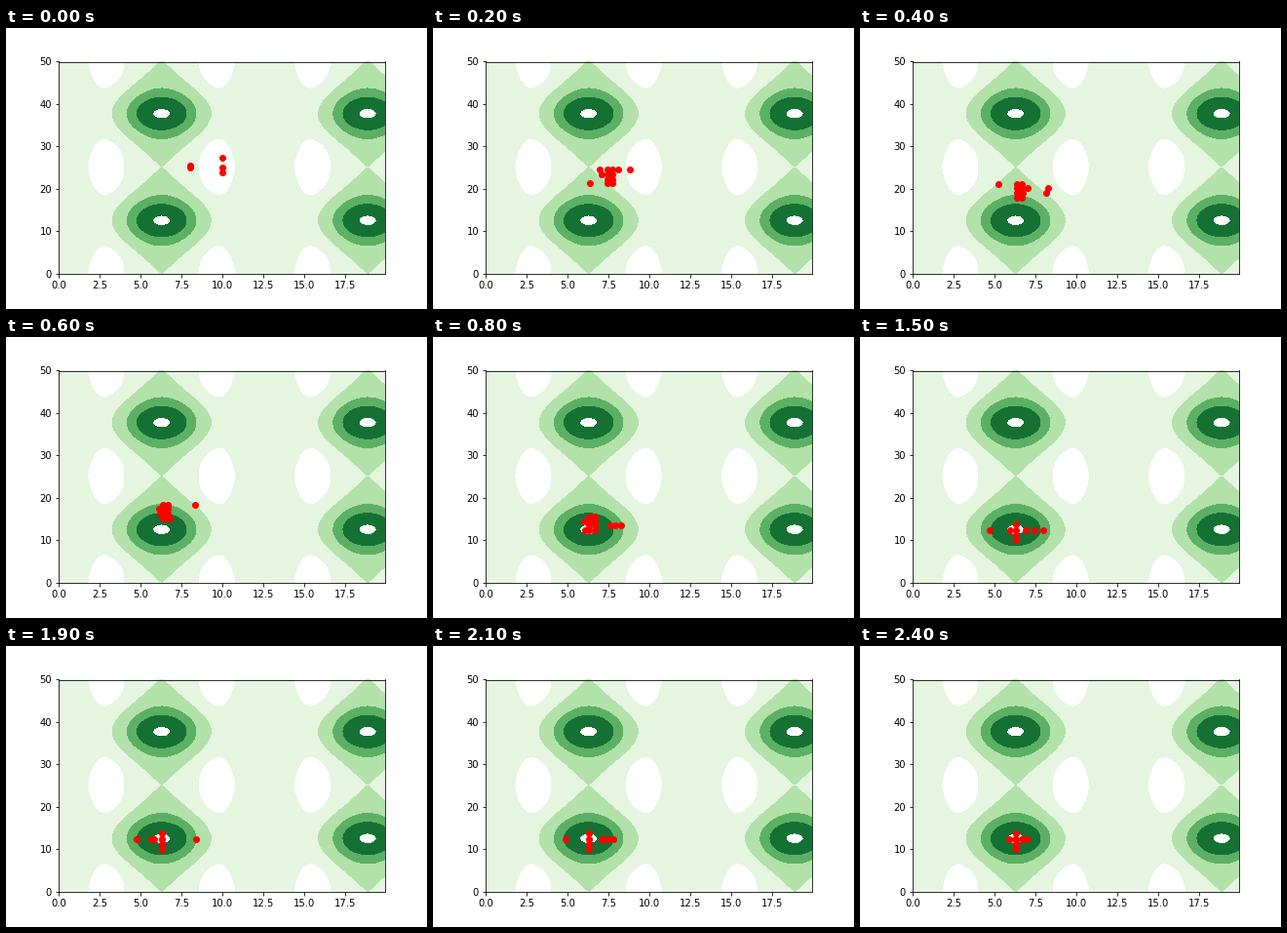
Recreate the animation shown at these times as a matplotlib script. Size 432 by 288 pixels, loop 2.5 s.

```python
import numpy as np
import matplotlib.pyplot as plt
from matplotlib.animation import FuncAnimation

FRAMES, STEP_MS = 25, 100
PEAK_X, PEAK_Y = 6.32, 12.5
CONVERGED = 10
LEVELS = [-1, 0, 1.29, 2.2, 3.03]
GREENS = ["#e5f5e0", "#b2e1aa", "#5cb064", "#157133"]


def fitness(x, y):
    """Periodic landscape with peaks at (2 pi, 4 pi) and saddles between."""
    p, s = -np.cos(x / 2), (1 - np.cos(y / 4)) / 2
    valley = ((p + 0.097) ** 2 - 1.2034) / 0.9204
    slope = 1.42 * p**2
    bend = 1.17 + 1.5 * p - 0.95 * p**4
    return valley + slope * s + bend * s**2


def start():
    """Two parents, each with a few mutated y genes."""
    return [(8.05, 25.1), (8.05, 25.5)] + [(10, y) for y in (23.9, 25, 27.4)]


def climbing(n, rng):
    """Block of shared genes drifting to the peak, with x mutants around it."""
    cx = np.interp(n, [1, 4, CONVERGED], [8, 6.35, PEAK_X])
    cy = np.interp(n, [1, 4, 8, CONVERGED], [24.5, 19.6, 14, PEAK_Y])
    ys = cy + np.linspace(-1.6, 1.6, 4)
    block = [(cx + dx, y) for dx in (0, 0.3) for y in ys]
    mutants = [(cx + dx, rng.choice(ys)) for dx in rng.uniform(-1.4, 2, 5)]
    return block + mutants


def settled(rng):
    """Cross of single-gene mutants around the peak."""
    column = [(PEAK_X, PEAK_Y + 1.2 * k) for k in range(-2, 2)]
    row = [(PEAK_X + dx, PEAK_Y) for dx in rng.uniform(-1.8, 2.4, 5)]
    return column + row


def population(n):
    if n == 0:
        return start()
    rng = np.random.default_rng(n)
    return climbing(n, rng) if n < CONVERGED else settled(rng)


fig, ax = plt.subplots(figsize=(6, 4), dpi=72)
fig.subplots_adjust(left=0.125, right=0.9, bottom=0.125, top=0.8815)
X, Y = np.meshgrid(np.arange(0, 20, 0.1), np.arange(0, 50, 0.1))
ax.contourf(X, Y, fitness(X, Y), levels=LEVELS, colors=GREENS)
ax.set(xlim=(0, 19.9), ylim=(0, 50))
# The grid stops just short of 50, and the frame closes there.
ax.spines["top"].set_position(("data", 49.9))
dots = ax.scatter([], [], color="red", s=36, zorder=2)


def draw(n):
    dots.set_offsets(population(n))
    return dots,


anim = FuncAnimation(fig, draw, frames=FRAMES, interval=STEP_MS,
                     repeat=True, repeat_delay=0)
plt.show()
```
